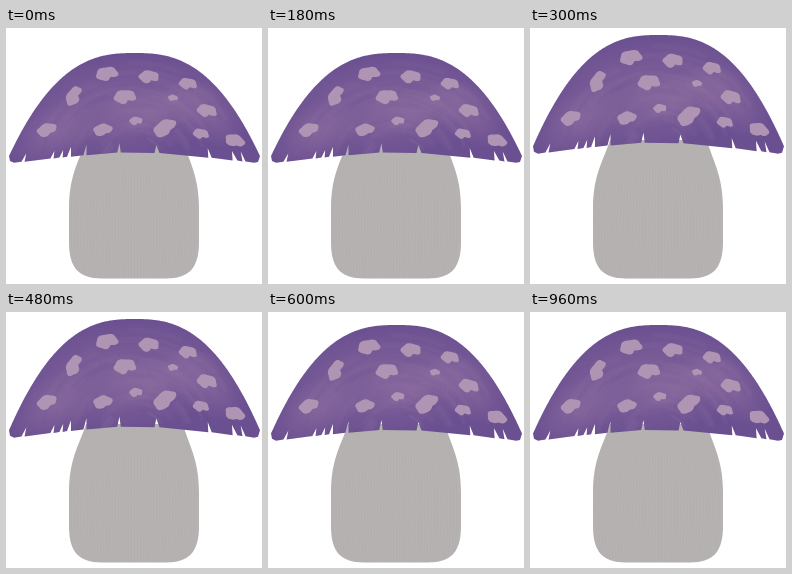
Animation, 256 px wide and 256 px high, one loop 1200 ms. Source, as an HTML page with a canvas:

```html
<!DOCTYPE html>
<html lang="en">
<head>
<meta charset="utf-8">
<title>Mushroom</title>
<style>
html, body { margin: 0; width: 100%; height: 100%; overflow: hidden; background: #fff; }
canvas { display: block; width: 256px; height: 256px; }
</style>
</head>
<body>
<canvas id="stage" width="256" height="256"></canvas>
<script>
const ctx = document.getElementById('stage').getContext('2d');
const LOOP = 1200;
const BEAT = 300;
const MID = 128.5;
const HALF = 125.5;
const CAP_TOP = 25;
const CAP_FOOT = 136;

// The cap stretches between its top and its foot; the last pose holds longer.
const poses = [
  { top: 25, foot: 136 },
  { top: 7, foot: 127 },
  { top: 13, foot: 130 }
];

// Centre and half width; the turn follows the dome unless given.
const spots = [
  { x: 101, y: 46, r: 11 }, { x: 143, y: 49, r: 10 }, { x: 182, y: 56, r: 9 },
  { x: 68, y: 68, r: 10.5, turn: -1 }, { x: 119, y: 69, r: 11 }, { x: 167, y: 70, r: 5 },
  { x: 201, y: 83, r: 10 }, { x: 41, y: 102, r: 10 }, { x: 97, y: 102, r: 9.5 },
  { x: 130, y: 93, r: 6.5 }, { x: 159, y: 100, r: 12, turn: -0.5 },
  { x: 195, y: 106, r: 8 }, { x: 229, y: 113, r: 10 }
];

// Where the rim is torn, from right to left.
const tears = [238, 229, 204, 151, 113, 79, 63, 55, 46, 17];

const side = x => Math.abs((x - MID) / HALF);
const dome = x => CAP_TOP + 103 * side(x) ** 2.6;
const rim = x => 124 + 11.5 * side(x) ** 1.4;

function seeded(seed) {
  return () => (seed = (seed * 16807) % 2147483647) / 2147483647;
}

function drawStem() {
  ctx.save();
  ctx.beginPath();
  ctx.moveTo(80, 112);
  ctx.bezierCurveTo(74, 132, 63, 146, 63, 180);
  ctx.lineTo(63, 214);
  ctx.bezierCurveTo(63, 239, 72, 250.5, 96, 250.5);
  ctx.lineTo(160, 250.5);
  ctx.bezierCurveTo(184, 250.5, 193, 239, 193, 214);
  ctx.lineTo(193, 180);
  ctx.bezierCurveTo(193, 146, 182, 132, 177, 112);
  ctx.closePath();
  ctx.fillStyle = '#b5b2b1';
  ctx.fill();
  ctx.clip();

  // Fine grain that bulges with the stem.
  ctx.lineWidth = 0.8;
  for (let u = -1; u <= 1; u += 0.05) {
    ctx.strokeStyle = 'rgba(150,146,146,.12)';
    ctx.beginPath();
    ctx.moveTo(MID + u * 48, 110);
    ctx.bezierCurveTo(MID + u * 66, 145, MID + u * 66, 205, MID + u * 60, 252);
    ctx.stroke();
  }
  ctx.restore();
}

function capPath() {
  const rnd = seeded(21);
  ctx.beginPath();
  for (let x = MID - HALF; x <= MID + HALF; x++) ctx.lineTo(x, dome(x));
  ctx.lineTo(252, 134);
  ctx.lineTo(248, rim(248));
  for (const x of tears) {
    const gap = 1.5 + rnd();
    const depth = 7 + rnd() * 4;
    ctx.lineTo(x + gap, rim(x));
    ctx.lineTo(x + (MID - x) * 0.03, rim(x) - depth);
    ctx.lineTo(x - gap, rim(x));
  }
  ctx.lineTo(8, rim(8));
  ctx.lineTo(4, 133);
  ctx.closePath();
}

function glow(x, y, rx, ry, turn) {
  ctx.save();
  ctx.translate(x, y);
  ctx.rotate(turn);
  ctx.scale(rx, ry);
  const g = ctx.createRadialGradient(0, 0, 0, 0, 0, 1);
  g.addColorStop(0, 'rgba(148,114,162,.55)');
  g.addColorStop(0.5, 'rgba(148,114,162,.3)');
  g.addColorStop(1, 'rgba(148,114,162,0)');
  ctx.fillStyle = g;
  ctx.fillRect(-1, -1, 2, 2);
  ctx.restore();
}

function brushStrokes() {
  const rnd = seeded(77);
  ctx.lineCap = 'round';
  for (let i = 0; i < 60; i++) {
    const r = 0.25 + rnd() * 0.7;
    const a = Math.PI * (1.05 + rnd() * 0.75);
    ctx.strokeStyle = rnd() < 0.6 ? 'rgba(156,122,170,.08)' : 'rgba(96,72,138,.07)';
    ctx.lineWidth = 2 + rnd() * 5;
    ctx.beginPath();
    ctx.ellipse(MID, 138, 122 * r, 112 * r, 0, a, a + 0.25 + rnd() * 0.4);
    ctx.stroke();
  }
}

// A flat bean: an oval with a dent at its lower right.
function drawSpot({ x, y, r, turn = (x - MID) / 300 }) {
  ctx.save();
  ctx.translate(x, y);
  ctx.rotate(turn);
  ctx.beginPath();
  for (let a = 0; a < Math.PI * 2; a += 0.1) {
    const d = r * (1 - 0.4 * Math.exp(-(((a - 1.1) / 0.4) ** 2)) + 0.06 * Math.sin(5 * a + x));
    ctx.lineTo(d * Math.cos(a), d * 0.64 * Math.sin(a));
  }
  ctx.fill();
  ctx.restore();
}

function drawCap({ top, foot }) {
  const stretch = (foot - top) / (CAP_FOOT - CAP_TOP);
  ctx.save();
  ctx.translate(0, top - CAP_TOP * stretch);
  ctx.scale(1, stretch);
  capPath();
  ctx.fillStyle = '#6b5091';
  ctx.fill();
  ctx.clip();
  glow(118, 78, 115, 52, -0.1);
  glow(48, 105, 50, 28, -0.5);
  glow(150, 82, 65, 24, -0.3);
  glow(200, 85, 45, 28, 0.6);
  brushStrokes();
  ctx.fillStyle = '#b094b3';
  spots.forEach(drawSpot);
  ctx.restore();
}

function draw(pose) {
  ctx.fillStyle = '#fff';
  ctx.fillRect(0, 0, 256, 256);
  drawStem();
  drawCap(pose);
}

const start = performance.now();
let shown;

function tick() {
  const beat = Math.floor(((performance.now() - start) % LOOP) / BEAT);
  const pose = poses[Math.min(beat, poses.length - 1)];
  if (pose !== shown) draw(shown = pose);
  requestAnimationFrame(tick);
}
tick();
</script>
</body>
</html>
```
